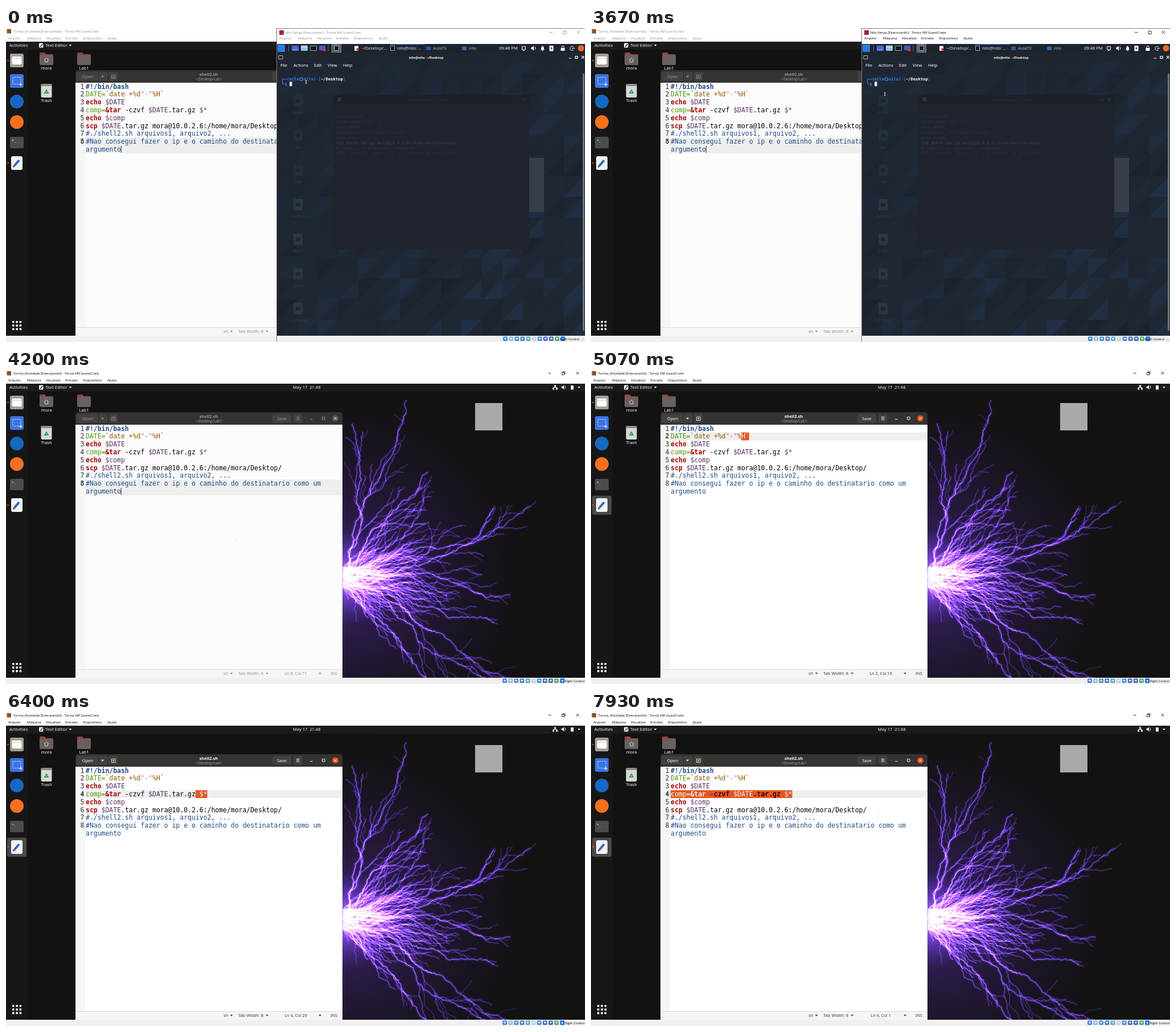
Recreate the animation shown at these times as an HTML page with a canvas. Size 1017 px wide and 551 px high, loop 8 s.

```html
<!DOCTYPE html>
<html lang="pt">
<head>
<meta charset="utf-8">
<title>Desktop</title>
<style>
html, body { margin: 0; width: 100%; height: 100%; overflow: hidden; background: #151414; }
canvas, svg { position: absolute; left: 0; top: 0; width: 1017px; height: 551px; }
text { white-space: pre; }
.win { font-family: "Open Sans", sans-serif; }
.ui { font-family: "Noto Sans", sans-serif; }
.mono { font-family: "DejaVu Sans Mono", monospace; }
.mid { text-anchor: middle; }
.end { text-anchor: end; }
.b { font-weight: 700; }
#host { --title: #8c8c8c; --fg: #9a9893; --foot: #929292; --paper: #fcfcfc; --close: #5b5855; }
#host.raised { --title: #000; }
#host.focused { --fg: #fff; --foot: #3d3d3d; --paper: #fff; --close: #e95420; }
#dockMark { opacity: 0; }
.focused #dockMark { opacity: 1; }
#guest { --title: #8c8c8c; }
#guest.active { --title: #000; }
.key { fill: #a40000; font-weight: 700; }
.str { fill: #8f5902; }
.quote { fill: #ad7fa8; }
.var { fill: #5c3566; }
.name { fill: #4e9a06; }
.note { fill: #204a87; }
#picked, #picked tspan { fill: #fff; }
</style>
</head>
<body>
<canvas id="wall" width="1017" height="551"></canvas>
<svg id="stage" viewBox="0 0 1017 551"></svg>
<script>
const LOOP = 8000, TICK = 1000 / 15;
const COL = 6.885, ROW = 13.8, LEFT = 140, TOP = 95.8;

function random(state) {
  return () => (state = (state * 16807) % 2147483647) / 2147483647;
}

// ---------- wallpaper ----------
function paintWall() {
  const c = document.getElementById('wall').getContext('2d');
  const rnd = random(4217), ox = 598, oy = 364;
  c.fillStyle = '#131212';
  c.fillRect(0, 0, 1017, 551);

  const radial = (r, stops) => {
    const g = c.createRadialGradient(ox, oy, 0, ox, oy, r);
    stops.forEach(([at, color]) => g.addColorStop(at, color));
    return g;
  };
  const glow = (r, stops) => {
    c.fillStyle = radial(r, stops);
    c.fillRect(500, 0, 517, 551);
  };
  c.globalCompositeOperation = 'lighter';
  glow(330, [[0, 'rgba(80,35,190,.55)'], [.45, 'rgba(45,18,105,.32)'], [1, 'rgba(20,8,50,0)']]);

  const core = radial(390, [[0, '#e6c8ff'], [.22, '#a778ff'], [.55, '#7546d6'], [1, '#4d2f92']]);
  const halo = radial(390, [[0, '#5a28d8'], [.6, '#35168c'], [1, '#1d0c4c']]);

  function bolt(x, y, base, length, width, depth) {
    const twigs = [];
    let heading = base;
    c.beginPath();
    c.moveTo(x, y);
    for (let s = 0; s < length; s += 4) {
      heading += (rnd() - .5) * .36 + (base - heading) * .06;
      const a = heading + (rnd() - .5) * 1.1;
      x += 4 * Math.cos(a);
      y += 4 * Math.sin(a);
      c.lineTo(x, y);
      if (depth && rnd() < .075) {
        twigs.push([x, y, heading + (rnd() - .5) * 1.3, (length - s) * .55 + 8, width * .6, depth - 1]);
      }
    }
    c.strokeStyle = halo;
    c.globalAlpha = .28;
    c.lineWidth = width * 4.5;
    c.stroke();
    c.strokeStyle = core;
    c.globalAlpha = Math.min(.85, .35 + width * .35);
    c.lineWidth = width;
    c.stroke();
    twigs.forEach(t => bolt(...t));
  }

  [[-1.22, 350], [-1.36, 290], [-.5, 375], [-.26, 315], [-.05, 310], [.28, 290],
   [.38, 390], [.46, 440], [.9, 235], [-.85, 250]]
    .forEach(([a, len]) => bolt(ox, oy, a, len, 1.3, 2));
  for (let i = 0; i < 70; i++) {
    bolt(ox - 6, oy + (rnd() - .5) * 36, (rnd() + rnd() - 1) * 1.05, 50 + rnd() * 170, .5 + rnd() * .4, 1);
  }
  c.globalAlpha = 1;
  glow(85, [[0, 'rgba(235,190,255,.6)'], [.4, 'rgba(150,85,255,.38)'], [1, 'rgba(70,30,180,0)']]);
  c.globalCompositeOperation = 'source-over';
}

// ---------- drawing helpers ----------
const rect = (x, y, w, h, fill, more = '') =>
  `<rect x="${x}" y="${y}" width="${w}" height="${h}" fill="${fill}" ${more}/>`;
const box = (x, y, w, h, fill, r = 2) => rect(x, y, w, h, fill, `rx="${r}"`);
const disc = (x, y, r, fill) => `<circle cx="${x}" cy="${y}" r="${r}" fill="${fill}"/>`;
const line = (d, color, w = 1, more = '') =>
  `<path d="${d}" fill="none" stroke="${color}" stroke-width="${w}" ${more}/>`;
const shape = (d, fill) => `<path d="${d}" fill="${fill}"/>`;
const text = (x, y, s, size, fill, cls = 'ui') =>
  `<text x="${x}" y="${y}" font-size="${size}" fill="${fill}" class="${cls}">${s}</text>`;
const down = (x, y, fill) => shape(`M${x - 2.5} ${y - 1.3}h5l-2.5 2.8z`, fill);

function windowFrame(x, title, mark) {
  const names = ['Arquivo', 'Máquina', 'Visualizar', 'Entrada', 'Dispositivos', 'Ajuda'];
  const at = [4, 37, 70, 104, 135, 178];
  return rect(x, 0, 1017 - x, 24, '#fff') +
    names.map((n, i) => text(x + at[i], 20, n, 6, 'var(--title)', 'win')).join('') +
    title + mark;
}

function windowButtons([a, b, c], restore) {
  const ink = 'var(--title)';
  return line(`M${a - 2.5} 5.5h5M${c - 2.5} 3l5 5m0 -5l-5 5`, ink, .8) +
    line(restore ? `M${b - 2.5} 4.5h4v4h-4zM${b - 1} 4.3v-1.4h4v4h-1.3` : `M${b - 2.5} 3.5h5v5h-5z`, ink, .8);
}

function deviceBar(x, first, labelX) {
  const tints = ['#2f7ed8', '#8fb4d8', '#4c86c6', '#3f78c0', '#4aa3df', '#c9ccd0', '#2d8be0', '#3b62b8', '#3d5da8', '#3fa06a'];
  return rect(x, 540, 1017 - x, 11, '#f0f0f0') +
    tints.map((t, i) => {
      const cx = first + i * 10.1;
      return box(cx - 3.8, 541.5, 7.6, 7.6, t, 1.5) + rect(cx - 1.8, 543.4, 3.6, 3, '#e6f0fa');
    }).join('') +
    box(first + 97.2, 541.3, 8, 8, '#1976d2', 1.5) + shape(`M${first + 99} 544.5h4.4l-2.2 3z`, '#fff') +
    text(labelX, 547.8, 'Right Control', 5.6, '#000', 'win');
}

// ---------- code ----------
const s = (cls, t) => `<tspan class="${cls}">${t}</tspan>`;
const rows = [
  s('note b', '#!/bin/bash'),
  s('name', 'DATE=') + s('str', '`date +%d') + s('quote', '"-"') + s('str', '%H`'),
  s('key', 'echo') + ' ' + s('var', '$DATE'),
  s('name', 'comp=') + s('key', '&amp;tar') + ' -czvf ' + s('var', '$DATE') + '.tar.gz ' + s('var', '$*'),
  s('key', 'echo') + ' ' + s('var', '$comp'),
  s('key', 'scp') + ' ' + s('var', '$DATE') + '.tar.gz mora@10.0.2.6:/home/mora/Desktop/',
  s('note', '#./shell2.sh arquivos1, arquivo2, ...'),
  s('note', '#Nao consegui fazer o ip e o caminho do destinatario como um'),
  s('note', 'argumento')
];
const plain = rows.map(r => r.replace(/<[^>]*>/g, '').replace('&amp;', '&'));
const rowTop = i => TOP + ROW * i;
const codeText = rows.map((r, i) => text(LEFT, rowTop(i) + 10.8, r, 11.44, '#000', 'mono')).join('');

// ---------- host desktop ----------
function folder(x, y) {
  return shape(`M${x} ${y + 2}q0 -2 2 -2h7l2.5 3h10.5q2 0 2 2v4h-24z`, '#9a3f3c') +
    box(x, y + 4, 24, 18, '#68615f', 2);
}

function desktop() {
  const ink = '#f2f2f2';
  const grid = [0, 1, 2].flatMap(i => [0, 1, 2].map(j => box(11 + i * 6.3, 514 + j * 6.3, 3.6, 3.6, '#fff', .8)));
  return rect(0, 24, 1017, 14, '#1b1b1b') + rect(0, 38, 38, 502, '#171717') +
    text(6, 33.3, 'Activities', 7.8, ink) +
    box(58, 26.5, 7.5, 8, '#eee', 1.5) + line('M60 33l4.5 -5', '#333', 1.3) +
    text(69, 33.3, 'Text Editor', 7.7, ink) + down(113, 30.5, ink) +
    text(504, 33.3, 'May 17  21:48', 7.5, ink) +
    line('M964.5 27v3M961.5 33v-2.5h6v2.5', ink) +
    rect(963, 26.5, 3, 3, ink) + rect(960, 31.5, 3, 3, ink) + rect(966, 31.5, 3, 3, ink) +
    shape('M975.5 28.7h2l2.7 -2.5v8l-2.7 -2.5h-2z', ink) + line('M982 28q2 2.3 0 4.6', ink) +
    box(992, 27, 5, 7.5, ink, 1) + down(1006.5, 30.5, ink) +
    rect(2, 220.5, 34, 33.5, '#4b4a4a', 'rx="3" id="dockMark"') +
    disc(3.5, 57, 1.3, '#e95420') + disc(3.5, 237, 1.3, '#e95420') +
    box(7, 45, 24, 24, '#a59f98', 3) + box(10.5, 50, 17, 14, '#fff', 2) + rect(10.5, 53, 17, 1, '#d5d0ca') +
    box(7, 81, 24, 24, '#3a74e0', 3) +
    line('M12 86.5h14v12h-14z', '#dfe9ff', 1, 'stroke-dasharray="2 1.5"') + line('M26 96v6m-3 -3h6', '#fff') +
    disc(19, 129, 12, '#1668c4') + disc(19, 165, 12, '#f5711f') +
    box(7, 191, 24, 20, '#4d4c4c', 2) + text(10, 199, '&gt;_', 6, '#fff', 'mono') +
    box(9, 225, 20, 24, '#f4f3f2', 3) + line('M14.5 242l8.5 -10', '#3465c0', 4) + shape('M12 245l1 -4l2.5 2.5z', '#333') +
    grid.join('') +
    folder(59, 43) + line('M67 56l4 -3.5l4 3.5M68.5 55.5v4h5v-4', '#ddd', .9) + folder(125, 43) +
    text(71, 73.3, 'mora', 7.5, '#fff', 'ui mid') + text(137, 73.3, 'Lab1', 7.5, '#fff', 'ui mid') +
    box(61.5, 98, 19, 24, '#d9d8d6', 2.5) + box(61.5, 98, 19, 4, '#8e8c89', 1.5) +
    line('M68 114l3 -5l3 5z', '#3a9b4e', 1.8) + text(71, 130, 'Trash', 7.5, '#fff', 'ui mid') +
    rect(824, 58, 48, 48, '#a9a9ab');
}

function editor() {
  const fg = 'var(--fg)', foot = 'var(--foot)';
  const header = shape('M122 96v-17q0 -5 5 -5h459q5 0 5 5v17z', '#353230') +
    box(124, 77, 54, 15.5, '#43403e') + line('M162.5 77v15.5', '#2b2927') +
    box(181, 77, 15.5, 15.5, '#43403e') + box(468, 77, 33, 15.5, '#43403e') + box(505, 77, 15.5, 15.5, '#43403e') +
    text(143.5, 87.6, 'Open', 7.6, fg, 'ui mid') + down(169.5, 85, fg) +
    line('M185.5 88.5v-6h6.5v6zM188.7 84v3m-1.5 -1.5h3', fg, .8) +
    text(356, 83.8, 'shell2.sh', 7.4, fg, 'ui mid b') + text(356, 91.5, '~/Desktop/Lab1', 6.3, '#a09d99', 'ui mid') +
    text(484.5, 87.6, 'Save', 7.6, fg, 'ui mid') +
    line('M510 82.5h5.5m-5.5 2.3h5.5m-5.5 2.3h5.5M534 86.5h4.5M555.5 82.5h4.5v4.5h-4.5z', fg, .9) +
    disc(578.5, 84.8, 5.4, 'var(--close)') + line('M576.5 82.8l4 4m0 -4l-4 4', '#fff', 1);
  const status = rect(122, 525, 469, 15, '#f6f5f4') + line('M122 525.5h469', '#dcdad8') +
    text(382, 535.3, 'sh', 7.6, foot) + down(396, 532.5, foot) +
    text(408, 535.3, 'Tab Width: 8', 7.6, foot) + down(458.5, 532.5, foot) +
    text(509, 535.3, s('place', ''), 7.3, foot, 'ui mid') +
    down(551.5, 532.5, foot) + text(570, 535.3, 'INS', 7.2, foot);
  const numbers = rows.slice(0, 8).map((_, i) =>
    text(137.5, rowTop(i) + 10.8, i + 1, 11.44, '#2e3436', 'mono end num')).join('');
  return header + rect(122, 96, 469, 430, 'var(--paper)') + rect(122, 96, 17, 430, '#f6f6f5') +
    '<path id="current" fill="#eeeeed"/><path id="mark" fill="#e95420"/>' + numbers + codeText +
    `<clipPath id="cut"><path id="cutPath"/></clipPath><g id="picked" clip-path="url(#cut)">${codeText}</g>` +
    '<path id="caret" stroke="#222" stroke-width="1"/>' + status;
}

// ---------- guest window ----------
function facets() {
  const rnd = random(77), out = [];
  for (let y = 44; y < 540; y += 36) {
    for (let x = 476; x < 1017; x += 36) {
      const low = (y - 44) / 500, right = (x - 476) / 540;
      const alpha = (rnd() * .2 * (.25 + low * .5 + right * .45)).toFixed(3);
      const d = rnd() < .5 ? `M${x} ${y}h36l-36 36z` : `M${x + 36} ${y}v36h-36z`;
      out.push(shape(d, `rgba(${rnd() < .6 ? '36,84,150' : '8,14,24'},${alpha})`));
    }
  }
  return out.join('');
}

function guestPanel() {
  const ink = '#dfe3e8', off = '#aeb5bd';
  const screen = (x, w) => box(x, 31, w, 9, '#14181d', 1) + line(`M${x + .5} 31.5h${w - 1}v8h-${w - 1}z`, '#cfd3d8', .8);
  return rect(476, 28, 541, 16, '#1d242d') + rect(477, 29, 13, 13, '#2a7de1') +
    line('M496.5 30v11M566 30v11', '#77808a', .8) +
    box(502, 31, 12, 9, '#4b62d8', 1) + rect(502, 37.5, 12, 1, '#9fb0ff') +
    box(518, 30.5, 12, 9.5, '#8cc4f5', 1) + rect(518, 33, 12, 1, '#e8f4ff') + screen(534, 12) +
    box(550, 31, 11, 8, '#4759c8', 1) + disc(559, 38.5, 2.5, '#e0343c') +
    box(572, 28.5, 17, 14.5, '#515962', 1) + line('M572.5 29h16v13.5h-16z', '#98a0a8', .7) + screen(576, 9) +
    rect(674, 28, 62, 1.2, '#2f7de0') +
    box(612, 31.5, 7, 8.5, '#f4f4f4', 1) + disc(617.5, 37.5, 2.2, '#d8323c') + text(624, 38.3, '~/Desktop/…', 7.5, ink) +
    screen(675, 8) + text(687, 38.3, 'nilo@nilo: …', 7.5, ink) +
    box(738, 32.5, 8, 6.5, '#2458a8', 1) + text(750, 38.3, 'AulaTX', 7.5, off) +
    box(801, 32.5, 8, 6.5, '#2f68bd', 1) + text(813, 38.3, 'nilo', 7.5, off) +
    text(866, 38.3, '09:48 PM', 7.6, '#f0f2f4') +
    line('M906.5 32.5h6v5.5h-6zM908 39.5h3', '#fff') +
    shape('M922.5 33.8h2l2.5 -2.5v8.5l-2.5 -2.5h-2z', '#fff') + line('M928.8 33q2.3 2.5 0 5', '#fff') +
    shape('M939 38.5q1.3 -1 1.3 -4q.5 -3 2.2 -3t2.2 3q0 3 1.3 4zM941.5 39h2v1.3h-2z', '#fff') +
    box(954.5, 31, 7, 9.5, '#fff', 1) + shape('M958.5 32l-2.2 4h1.6l-.5 3l2.5 -4h-1.7z', '#222') +
    box(974.5, 35, 7, 5, '#fff', 1) + line('M976 35v-1.5q0 -2 2 -2t2 2v1.5', '#fff') +
    line('M997 33.5a3.5 3.5 0 1 0 0 4.5M994 35.7h5', '#fff') + disc(1010, 35.5, 5.5, '#ef6a25');
}

function ghosts() {
  const labels = ['Home', 'nilo', 'Trash', 'shell2.sh', 'Teste1', 'Teste2', '17-21.tar.gz'];
  const icons = labels.map((label, i) => {
    const y = 128 + i * 60.7;
    return box(505, y - 10, 16, 20, i > 2 ? '#2b3744' : '#232f3c', 2) +
      rect(509, y - 3, 8, 6, '#1c2632') + text(513, y + 23, label, 6.2, '#323d49', 'ui mid');
  }).join('');
  const notes = ['#!/bin/bash', 'DATE=`date +%d"-"%H`', 'echo $DATE', 'comp=&amp;tar -czvf $DATE.tar.gz',
    'echo $comp', 'scp $DATE.tar.gz mora@10.0.2.6:/home/mora/Desktop',
    '#./shell2.sh arquivos1, arquivo2', '#Nao consegui fazer o ip e o caminho do destinatario'];
  return icons + rect(850, 228, 95, 95, '#353e49') +
    rect(574, 118, 345, 270, '#20252d') + rect(574, 118, 345, 15, '#1c2128') +
    box(582, 122, 7, 7, '#303740', 1) + text(740, 128.5, '~/Desktop/shell2.sh - Editor', 6, '#2b323b', 'ui mid') +
    line('M896 126h4M908 123.5l4 4m0 -4l-4 4', '#333b45') +
    notes.map((n, i) => text(580, 158 + i * 9.2, n, 7.1, i === 5 ? '#384551' : '#2b333d', 'mono')).join('');
}

function prompt() {
  const blue = '#3b82f6';
  const part = (x, t, fill = blue, cls = 'mono b') => text(x, 92.3, t, 7.15, fill, cls);
  return line('M494 89.8h-8.5v8.5h3.5', blue) +
    part(493.5, '(') + part(497.5, 'nilo') +
    line('M516 89.8a2.7 2.7 0 1 0 5.4 0a2.7 2.7 0 1 0 -5.4 0', blue, 1.2) +
    part(522.8, 'nilo') + part(540, ')') + part(544.3, '-[', blue, 'mono') +
    part(553, '~/Desktop', '#fff') + part(591.7, ']', blue, 'mono') +
    text(489.3, 101, '$', 7.15, blue, 'mono b') + rect(498, 94.3, 4.5, 7.7, '#e8eaed');
}

function guest() {
  const menu = [[482, 'File'], [505, 'Actions'], [541, 'Edit'], [565, 'View'], [592, 'Help']];
  return rect(475, 0, 542, 551, '#fff') +
    windowFrame(476, text(490.5, 10.3, 'Nilo-Setup [Executando] - Torvia VM GuestCrate', 6, 'var(--title)', 'win'),
      rect(480, 4, 8, 8, '#a3243f')) +
    `<g transform="translate(0 2)">${windowButtons([957.5, 981.5, 1005.5])}</g>` +
    rect(476, 28, 541, 512, '#1f2732') + facets() + ghosts() + guestPanel() +
    rect(476, 44, 541, 14, '#20262f') +
    line('M479 48.5h7v6h-7z', '#cfd3d8', .8) + text(738, 53.5, 'nilo@nilo: ~/Desktop', 5.9, '#fff', 'ui mid b') +
    line('M988.5 53h4.5M1000 49.5h4v4h-4zM1011 49l4.5 4.5m0 -4.5l-4.5 4.5', '#fff', 1.2) +
    menu.map(([x, n]) => text(x, 68.2, n, 7.5, '#fff')).join('') +
    rect(1013, 80, 3, 451, '#6f767e') + prompt() +
    deviceBar(476, 877, 973) + line('M475.5 0v551M475 .5h542', '#55585c', .8) +
    line('M1010 549l4 -4m-1.5 4l2.5 -2.5', '#a0a0a0', .7);
}

// ---------- assemble ----------
paintWall();
document.getElementById('stage').innerHTML =
  `<g id="host">${desktop()}${editor()}` +
  windowFrame(0, text(12.5, 8.3, 'Turma_Atividade [Executando] - Torvia VM GuestCrate', 6, 'var(--title)', 'win'),
    rect(1.5, 2, 7.5, 7.5, '#8a5428')) +
  windowButtons([955, 979, 1004], true) + deviceBar(0, 876, 982) + '</g>' +
  `<g id="guest">${guest()}</g>` +
  '<g id="beam"><path id="beamDark" d="M-1 -2.5h2M0 -2.5v5M-1 2.5h2" stroke="#fff" fill="none"/>' +
  '<path id="beamLight" d="M-.5 -2h1v1h-1zM-.5 2h1v1h-1z" fill="#b9b9b9"/></g>';

const $ = id => document.getElementById(id);
const nums = [...document.querySelectorAll('.num')];
const place = document.querySelector('.place');

// ---------- motion ----------
const path = [
  [0, 527, 95], [66, 528, 95], [590, 528, 96], [660, 528, 97], [3600, 528, 97], [3930, 470, 190],
  [4070, 405, 297], [4460, 405, 297], [4670, 350, 200], [4860, 281, 117], [4990, 278, 117],
  [5270, 215, 117], [5520, 147, 116], [5600, 150, 119], [5790, 222, 132], [5990, 222, 132],
  [6200, 355, 144], [6320, 355, 144], [6500, 312, 142], [6660, 262, 132], [6860, 215, 132],
  [6990, 170, 136], [7130, 139, 143], [7300, 139, 144], [7660, 380, 160], [7730, 449, 170],
  [7930, 505, 182]
];
const drags = [[4920, 5580], [6260, 7210]];

function mouseAt(t) {
  const i = path.findIndex(p => p[0] > t);
  if (i < 1) return path[i < 0 ? path.length - 1 : 0].slice(1);
  const [t0, x0, y0] = path[i - 1], [t1, x1, y1] = path[i];
  const k = (t - t0) / (t1 - t0);
  return [x0 + (x1 - x0) * k, y0 + (y1 - y0) * k];
}

function cellAt(t) {
  const [x, y] = mouseAt(t);
  const row = Math.max(0, Math.min(8, Math.floor((y - TOP) / ROW)));
  const col = Math.max(0, Math.min(plain[row].length, Math.round((x - LEFT) / COL)));
  return { row, col };
}

function selectionAt(t) {
  const drag = drags.filter(d => t >= d[0]).pop();
  if (!drag) return { head: { row: 8, col: 9 }, anchor: { row: 8, col: 9 } };
  return { head: cellAt(Math.min(t, drag[1])), anchor: cellAt(drag[0]) };
}

function selectionPath(a, b) {
  if (a.row > b.row || (a.row === b.row && a.col > b.col)) [a, b] = [b, a];
  let d = '';
  for (let r = a.row; r <= b.row; r++) {
    const x0 = LEFT + (r === a.row ? a.col : 0) * COL;
    const x1 = r === b.row ? LEFT + b.col * COL : 589.5;
    if (x1 > x0) d += `M${x0} ${rowTop(r)}H${x1}v${ROW}H${x0}z`;
  }
  return d;
}

function draw(t) {
  const raised = t >= 4190;
  $('host').setAttribute('class', (raised ? 'raised ' : '') + (t >= 4260 ? 'focused' : ''));
  $('guest').setAttribute('class', t >= 260 ? 'active' : '');
  $('guest').style.display = raised ? 'none' : '';

  const { head, anchor } = selectionAt(t);
  const lineNo = Math.min(head.row, 7);
  const d = selectionPath(anchor, head);
  $('mark').setAttribute('d', d);
  $('cutPath').setAttribute('d', d || 'M0 0');
  $('current').setAttribute('d', `M139 ${rowTop(lineNo)}h452v${ROW * (lineNo === 7 ? 2 : 1)}h-452z`);
  $('caret').setAttribute('d', d ? '' : `M${LEFT + head.col * COL + .3} ${rowTop(head.row) + .8}v12`);
  nums.forEach((n, i) => { n.style.fontWeight = i === lineNo ? 700 : 400; });
  place.textContent = `Ln ${lineNo + 1}, Col ${head.col + (head.row === 8 ? 61 : 0) + 1}`;

  const [x, y] = mouseAt(t);
  const dark = !raised && x > 475;
  $('beam').setAttribute('transform', `translate(${x} ${y})`);
  $('beamDark').style.display = dark ? '' : 'none';
  $('beamLight').style.display = dark ? 'none' : '';
}

function frame() {
  const t = performance.now() % LOOP;
  draw(Math.floor((t + 5) / TICK) * TICK);
  requestAnimationFrame(frame);
}
frame();
</script>
</body>
</html>
```
